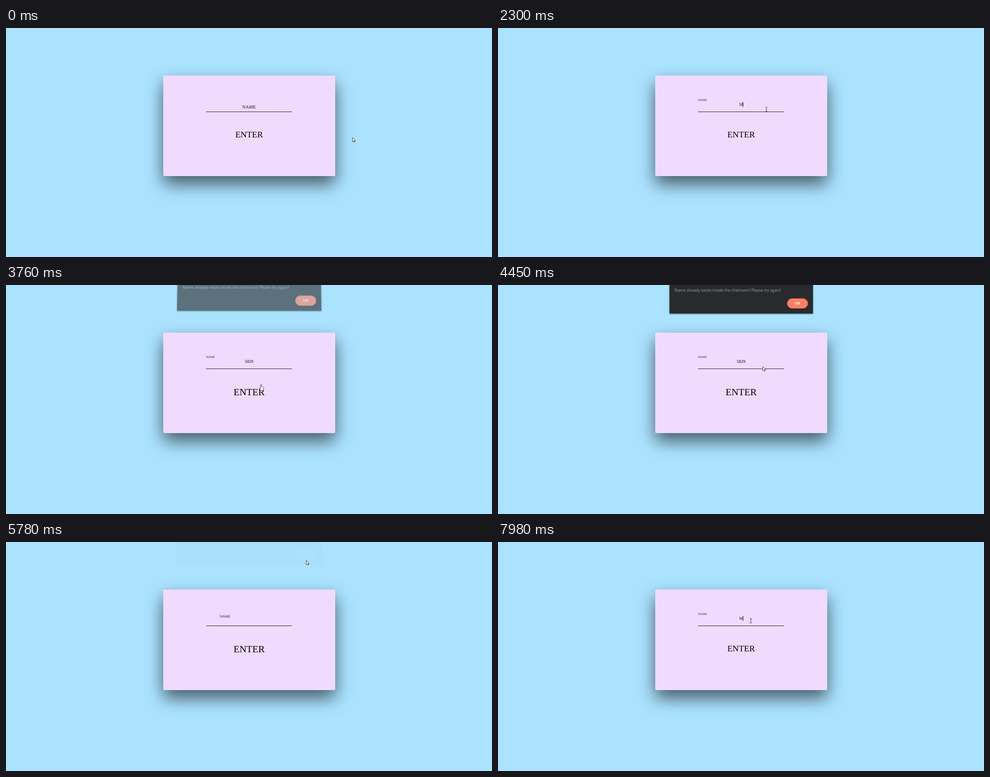
An HTML page that plays this animation: 1088 by 515 pixels, repeating every 8 s.

```html
<!DOCTYPE html>
<html lang="en">
<head>
<meta charset="utf-8">
<title>Chatroom login</title>
<style>
  html, body { margin: 0; width: 100%; height: 100%; overflow: hidden; background: #abe3ff; }
  #stage { position: relative; width: 1088px; height: 515px; overflow: hidden; }
  #card { position: absolute; left: 352px; top: 107px; width: 385px; height: 226px; border-radius: 3px;
    background: #f0dbff; box-shadow: 0 18px 38px rgba(0, 0, 0, .6); }
  #alert { position: absolute; left: 384px; top: -36px; width: 320.5px; height: 100px; background: #292a2d;
    box-shadow: 0 1px 3px rgba(0, 0, 0, .65); transform-origin: 50% 36px;
    font: 8.8px/12px "Open Sans", "Noto Sans", sans-serif; color: #9aa0a6; }
  #alert p { position: absolute; left: 11.3px; top: 42px; margin: 0; white-space: nowrap; }
  #ok { position: absolute; box-sizing: border-box; left: 263px; top: 65.5px; width: 46.5px; height: 23.5px;
    border: 1px solid #d9614a; border-radius: 12px; color: #fff; font-weight: 600;
    line-height: 21.5px; text-align: center; }
  svg { position: absolute; left: 0; top: 0; }
  text { font-family: "Liberation Serif", "Times New Roman", serif; text-rendering: geometricPrecision; }
  .mid { text-anchor: middle; }
</style>
</head>
<body>
<div id="stage">
  <div id="card"></div>
  <div id="alert">
    <p>Name already exists inside the chatroom! Please try again!</p>
    <div id="ok">OK</div>
  </div>
  <svg width="1088" height="515" viewBox="0 0 1088 515">
    <rect x="448" y="188" width="192" height="1" fill="#1c181e"/>
    <text id="label">NAME</text>
    <text id="value" class="mid" x="544.2" y="175.3" font-size="9.6"></text>
    <rect id="caret" y="166.5" width="1" height="11"/>
    <text id="enter" class="mid" x="544.3">ENTER</text>
    <g id="cursor" stroke="#222" stroke-width=".9" stroke-linejoin="round" fill="#fff">
      <path id="arrow" d="M.3 .4V9.8L2.5 7.8 4.1 11.2 5.6 10.5 4.1 7.3H7Z"/>
      <path id="beam" fill="none" d="M-2.2 -5Q0 -5 0 -4Q0 -5 2.2 -5M0 -4V4M-2.2 5Q0 5 0 4Q0 5 2.2 5"/>
      <path id="hand" d="M-1.2 1Q-1.2 -.3 0 -.3T1.2 1V5L4.6 5.8Q5.8 6.2 5.8 7.5V10L4.6 13.3H-.6L-3.6 9Q-4.2 7.2 -2.6 7.6L-1.2 8.8Z"/>
    </g>
  </svg>
</div>
<script>
const LOOP = 8000;
const $ = id => document.getElementById(id);
const clamp = v => Math.min(1, Math.max(0, v));
const mix = (a, b, p) => a + (b - a) * p;
const ramp = (t, from, to) => clamp((t - from) / (to - from));
const within = (t, spans) => spans.some(([a, b]) => t >= a && t < b);

// Pointer way points: time, x, y
const route = [
  [350, 775.5, 246], [1070, 601, 182], [1160, 601, 182], [1240, 603, 184], [1330, 601, 183],
  [3150, 601, 183], [3480, 571, 224], [4200, 571, 224], [4970, 657, 58.5], [5010, 657, 58.5],
  [5180, 672, 41], [6390, 672, 41], [6570, 593.3, 139], [6800, 519, 192], [7150, 566, 177]
];
const typed = [[0, ''], [2070, '5'], [2300, '58'], [2440, '582'], [2610, '5829'], [5686, ''], [7950, 'W']];
const caretOn = [[1220, 1720], [2070, 2960], [7140, 7600], [7950, LOOP]];

// CSS "ease": cubic-bezier(.25, .1, .25, 1)
function ease(x) {
  const bez = (u, a, b) => 3 * (1 - u) ** 2 * u * a + 3 * (1 - u) * u * u * b + u ** 3;
  let lo = 0, hi = 1;
  for (let i = 0; i < 20; i++) {
    const u = (lo + hi) / 2;
    if (bez(u, .25, .25) < x) lo = u; else hi = u;
  }
  return bez(lo, .1, 1);
}

function pointer(t) {
  const i = route.findIndex(k => k[0] > t);
  if (i === 0) return route[0].slice(1);
  if (i < 0) return route[route.length - 1].slice(1);
  const [t0, x0, y0] = route[i - 1], [t1, x1, y1] = route[i];
  let p = ramp(t, t0, t1);
  if (t1 - t0 > 300) p = p * p * (3 - 2 * p);
  return [mix(x0, x1, p), mix(y0, y1, p)];
}

function drawPointer(t) {
  const [x, y] = pointer(t);
  const modal = t >= 4200 && t < 5690;
  const inField = x > 448 && x < 640 && y > 166 && y < 190;
  const onEnter = x > 509 && x < 580 && y > 216 && y < 252;
  const kind = modal ? 'arrow' : inField ? 'beam' : onEnter ? 'hand' : 'arrow';
  for (const id of ['arrow', 'beam', 'hand']) $(id).style.display = id === kind ? '' : 'none';
  $('cursor').setAttribute('transform', `translate(${x} ${y})`);
}

function drawField(t) {
  const up = ease(ramp(t, 1220, 1620)) - ease(ramp(t, 5686, 6086)) + ease(ramp(t, 7140, 7540));
  const label = $('label');
  label.setAttribute('x', mix(528.7, 448, up));
  label.setAttribute('y', mix(181, 163.8, up));
  label.setAttribute('font-size', mix(10.4, 6.6, up));
  label.setAttribute('fill', `rgb(${mix(16, 26, up)}, 16, ${mix(16, 92, up)})`);

  const value = $('value');
  value.textContent = typed.filter(k => k[0] <= t).pop()[1];
  const width = value.textContent ? value.getComputedTextLength() : 0;
  $('caret').setAttribute('x', Math.floor(544.2 + width / 2 - .5));
  $('caret').style.display = within(t, caretOn) ? '' : 'none';

  const hover = t >= 3420 && t < 5800;
  $('enter').setAttribute('font-size', hover ? 21.6 : 19.2);
  $('enter').setAttribute('y', hover ? 248.3 : 245.7);
}

function drawAlert(t) {
  const shown = ramp(t, 3650, 3828) - ramp(t, 5590, 5785);
  const away = 1 - shown;
  $('alert').style.opacity = shown;
  $('alert').style.transform = away > 0
    ? `translateY(${-13.3 * away ** .75}px) perspective(800px) rotateX(${12 * away}deg)` : 'none';
  $('ok').style.background = t >= 5090 ? '#ff9178' : '#fa7f65';
}

function frame(now) {
  const t = now % LOOP;
  drawField(t);
  drawAlert(t);
  drawPointer(t);
  requestAnimationFrame(n => frame(n - start));
}
const start = performance.now();
frame(0);
</script>
</body>
</html>
```
